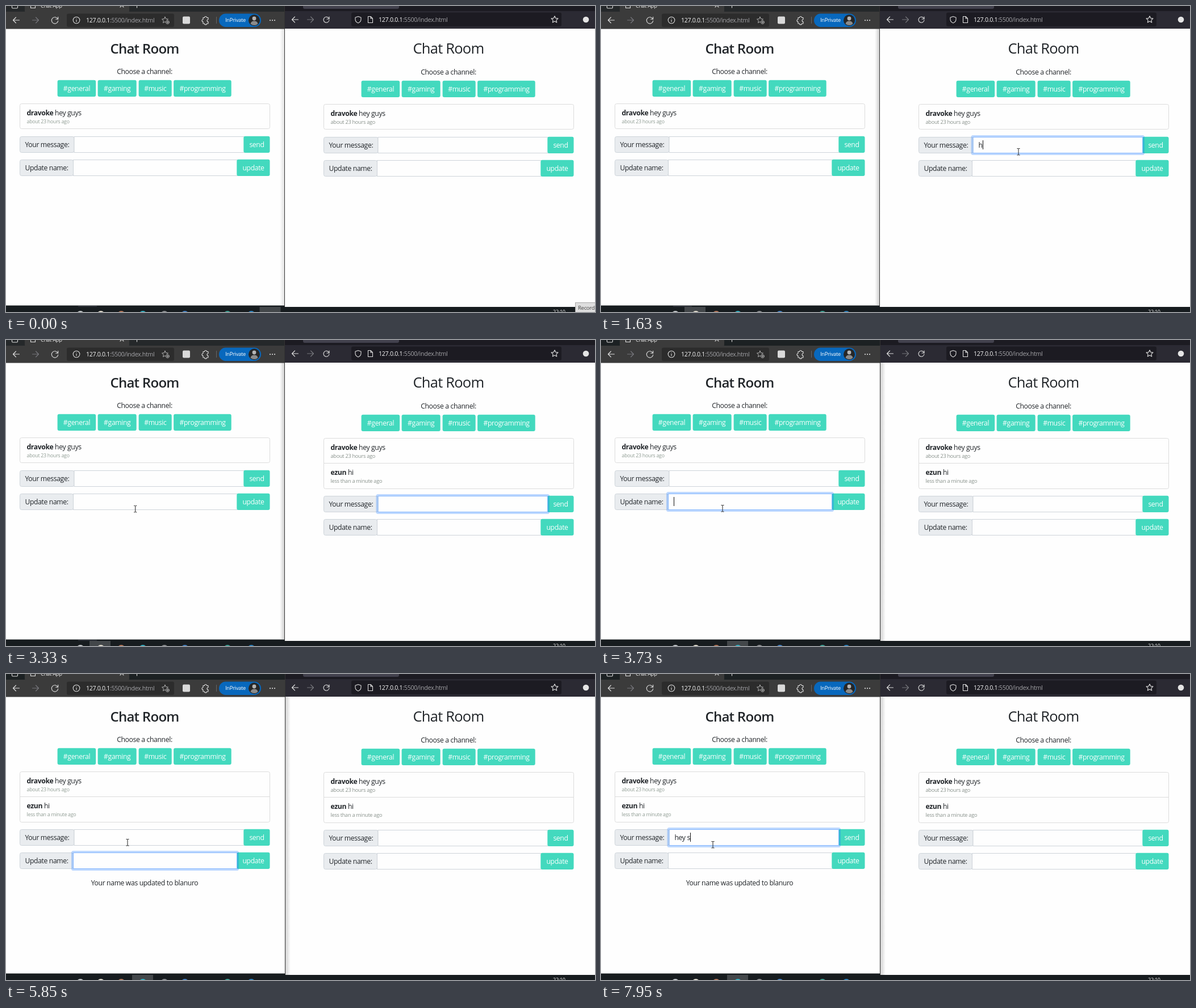
Recreate the animation shown at these times as an HTML page. Size 1037 by 540 pixels, loop 8000 ms.

```html
<!DOCTYPE html>
<html lang="en">
<head>
<meta charset="utf-8">
<title>Chat Room</title>
<style>
  html, body { margin: 0; width: 100%; height: 100%; overflow: hidden; background: #fefefe; }
  svg { display: block; width: 1037px; height: 540px; }
  text { font: 12.2px "Open Sans", "Noto Sans", sans-serif; letter-spacing: -.03em; white-space: pre; fill: #212529; }
  .b { font-weight: 700; }
  .mid { text-anchor: middle; }
  .line { fill: none; stroke: #dedede; stroke-width: 1.1; stroke-linecap: round; stroke-linejoin: round; }
  .dim { stroke: #77777d; }
  .soft { stroke: #b4b4b4; stroke-width: 1; }
</style>
</head>
<body>
<svg id="stage" viewBox="0 0 1037 540">
  <defs>
    <linearGradient id="shadeL"><stop offset="0" stop-opacity="0"/><stop offset="1" stop-opacity=".18"/></linearGradient>
    <linearGradient id="shadeR"><stop offset="0" stop-opacity=".18"/><stop offset="1" stop-opacity="0"/></linearGradient>
  </defs>
</svg>
<script>
const LOOP = 8000, SHIFT = 44, TEAL = '#43d9be';
const stage = document.getElementById('stage');

function add(tag, attrs, parent = stage, text) {
  const node = document.createElementNS('http://www.w3.org/2000/svg', tag);
  for (const key in attrs) node.setAttribute(key, attrs[key]);
  if (text !== undefined) node.textContent = text;
  return parent.appendChild(node);
}
const rect = (x, y, width, height, fill, parent, more) =>
  add('rect', { x, y, width, height, fill, ...more }, parent);
const disc = (cx, cy, r, fill, parent, more) => add('circle', { cx, cy, r, fill, ...more }, parent);
const path = (d, cls = 'line', parent) => add('path', { d, class: cls }, parent);
function label(x, y, text, parent, { size, fill, cls = '' } = {}) {
  const node = add('text', { x, y, class: cls }, parent, text);
  if (size) node.style.fontSize = size + 'px';
  if (fill) node.style.fill = fill;
  return node;
}
const show = (node, on) => node.setAttribute('visibility', on ? 'visible' : 'hidden');

// Toolbar icons
const arrow = (x, y, dir, cls) =>
  path(`M${x - 5.5} ${y}h11M${x + dir * .5} ${y - 5}l${dir * 5} 5l${-dir * 5} 5`, cls);
const reload = (x, y, r) =>
  path(`M${x + r - .5} ${y - 2}A${r} ${r} 0 1 0 ${x + r} ${y + 1}M${x + r} ${y - r}v4h-4`);
function star(x, y, r, cls) {
  let d = '';
  for (let i = 0; i < 10; i++) {
    const a = i * Math.PI / 5, k = i % 2 ? r * .48 : r;
    d += (i ? 'L' : 'M') + (x + k * Math.sin(a)).toFixed(1) + ' ' + (y - k * Math.cos(a)).toFixed(1);
  }
  path(d + 'Z', cls);
}
function address(x, y, size) {
  const node = label(x, y, '127.0.0.1', stage, { size, fill: '#f6f6f6' });
  add('tspan', { fill: '#a2a2a6' }, node, ':5500/index.html');
}

// Left browser
const tabStrip = rect(0, 0, 491, 11, '#25282a');
rect(33, -6, 184, 18, '#3b3b3b', stage, { rx: 4 });
rect(0, 10, 491, 30.5, '#3b3b3b');
path('M10.5 -4V2.5Q10.5 4 12 4H19Q20.5 4 20.5 2.5V-4M43.5 -4V3.5H51.5V-4M201 -4l6 6M207 -4l-6 6M230.5 -5v8');
label(61, 3, 'Chat App', stage, { size: 9.4, fill: '#eee' });
arrow(18, 25, -1);
arrow(52, 25, 1, 'line dim');
reload(86, 25, 5.7);
rect(107, 13.5, 189, 23.5, '#2c2c2c', stage, { rx: 3 });
disc(124, 25, 5.8, 'none', stage, { class: 'line' });
path('M124 24.5v3.3M124 22v.2');
address(141, 29, 10.6);
star(280, 25, 5.8, 'line soft');
disc(284.5, 28.7, 3.3, '#2c2c2c');
disc(284.5, 28.7, 2.9, 'none', stage, { class: 'line soft' });
path('M283 28.7h3M284.5 27.2v3', 'line soft');
rect(311, 18.5, 13, 13, '#d9d9d9', stage, { rx: 2 });
path('M347 20.5h2.5a2 2 0 0 1 4 0h2.5v3.2a2 2 0 0 0 0 4v3.3h-2.5a2 2 0 0 1 -4 0h-2.5v-3.3a2 2 0 0 1 0 -4z');
rect(370, 19, 1, 12, '#666');
rect(375, 13.5, 74, 23.5, '#0868bd', stage, { rx: 11.75 });
label(386, 28.3, 'InPrivate', stage, { size: 9.3, fill: '#fff' });
disc(437, 25.2, 10, '#272727');
disc(437, 22, 3.4, '#b5b5b5');
path('M430.5 31.5q1 -5 6.5 -5t6.5 5q-6 5 -13 0z').style.cssText = 'fill:#8b8b8b;stroke:none';
for (let i = -1; i < 2; i++) disc(469 + i * 4, 25.3, 1, '#eee');

// Right browser
rect(491, 0, 546, 10, '#1c1b22');
rect(523, -6, 169, 11, '#42414d', stage, { rx: 3 });
rect(491, 9, 546, 31, '#2b2a33');
arrow(509, 24, -1);
arrow(536, 24, 1, 'line dim');
reload(564, 24, 5);
rect(608, 11.5, 370, 24.5, '#1c1b22', stage, { rx: 3 });
path('M620 18.5l5 1.8v3.2q0 4.6 -5 6.5q-5 -1.9 -5 -6.5v-3.2z');
path('M637.5 18.5h4.5l3.5 3.5v7.5h-8zM642 18.5v3.5h3.5');
address(656, 28, 10.7);
star(966, 24, 6.3);
disc(1021, 24, 5.3, '#e4e4e4');

// Taskbar
rect(0, 528.5, 491, 11.5, '#171c1f');
rect(491, 531, 546, 9, '#171c1f');
const activeApp = rect(446, 531, 37, 9, '#43474a');
const appGlow = rect(127, 529, 33, 2, '#2b2f36');
[[131, '#c9cdd0'], [167, '#e8e2d4'], [203, '#b97a5c'], [241, '#35b4c6'], [279, '#8d8f92'],
 [315, '#4a86c9'], [390, '#3fa597'], [432, '#2f86c4']]
  .forEach(([x, fill]) => disc(x, 545, 7, fill));
label(963, 542.5, '22:10', stage, { size: 9, fill: '#f2f2f2' });

// Chat page, used once per browser
const FIELDS = {
  msg: { x: 119.5, y: 230, w: 299.5, title: 'Your message:', button: 'send' },
  name: { x: 118, y: 271, w: 289, title: 'Update name:', button: 'update' }
};

function button(x, y, w, text, parent) {
  rect(x - .4, y - .3, w + .6, 29.4, TEAL, parent, { rx: 3 });
  label(x + w / 2, y + 18.8, text, parent, { cls: 'mid', fill: '#fbfffe' });
}

function chatPage(dx, dy, heading, small, smallFill) {
  const root = add('g', { transform: `translate(${dx} ${dy})` });
  const title = label(244, 83.5 - dy * .3, 'Chat Room', root, { size: heading.size, cls: 'mid' });
  title.style.fontWeight = heading.weight;
  label(244, 120, 'Choose a channel:', root, { cls: 'mid' });
  button(91, 131, 67, '#general', root);
  button(162, 131, 67.5, '#gaming', root);
  button(234, 131, 57.5, '#music', root);
  button(295.5, 131, 101, '#programming', root);

  const frame = rect(24.5, 172.5, 440, 44, 'none', root, { rx: 3, stroke: '#dcdcdc' });
  const post = (y, who, text, when, parent) => {
    const node = label(36.5, y + 20.5, '', parent);
    add('tspan', { class: 'b' }, node, who);
    add('tspan', {}, node, ' ' + text);
    label(36.5, y + 34.3, when, parent, { size: small, fill: smallFill });
  };
  post(172.5, 'dravoke', 'hey guys', 'about 23 hours ago', root);
  const reply = add('g', {}, root);
  path('M24.5 216.5h440', '', reply).setAttribute('stroke', '#dcdcdc');
  post(172.5 + SHIFT + .3, 'ezun', 'hi', 'less than a minute ago', reply);

  const form = add('g', {}, root), fields = {};
  for (const key in FIELDS) {
    const { x, y, w, title, button: action } = FIELDS[key], end = x + w;
    rect(24.5, y + .5, x - 24, 28, '#e9ecef', form, { rx: 3, stroke: '#ced4da' });
    label(33.5, y + 18.7, title, form);
    rect(x + .5, y + .5, w, 28, '#fefefe', form, { stroke: '#ced4da' });
    button(end - .3, y, 464.6 - end, action, form);
    const ring = add('g', {}, form);
    rect(x - 1.5, y - 1.5, w + 3, 32, 'none', ring, { rx: 2, stroke: '#0d6efd', 'stroke-opacity': .27, 'stroke-width': 3 });
    rect(x + .5, y + .5, w - 1, 28, 'none', ring, { stroke: '#86b7fe' });
    const text = label(x + 10, y + 18.7, '', form);
    const caret = rect(x + 10, y + 6, 1, 16, '#111', form);
    fields[key] = { x, y, w, ring, text, caret };
  }
  const status = label(244, 329, 'Your name was updated to blanuro', form, { cls: 'mid' });
  return { dx, dy, fields, status,
    setReply(on) {
      this.shift = on ? SHIFT : 0;
      frame.setAttribute('height', 44 + this.shift + (on ? 1 : 0));
      form.setAttribute('transform', `translate(0 ${this.shift})`);
      show(reply, on);
    } };
}
const pages = {
  L: chatPage(0, 0, { size: 24, weight: 600 }, 8.8, '#8f9c93'),
  R: chatPage(535, 1, { size: 25.5, weight: 400 }, 9.2, '#88918b')
};

// Window edges
const edge = rect(490, 0, 1, 531, '#333');
const shadeL = rect(482, 40, 8, 488, 'url(#shadeL)');
const shadeR = rect(492, 40, 9, 491, 'url(#shadeR)');

// Tooltips and pointer
function tip(x, y, w, h, fill, border, text, style) {
  const g = add('g', {});
  rect(x + .5, y + .5, w - 1, h - 1, fill, g, { stroke: border });
  label(x + 5, y + h / 2 + 3.3, text, g, style);
  return g;
}
const recordTip = tip(1002, 523, 40, 20, '#dedede', '#a8a8a8', 'Record', { size: 9.5, fill: '#444' });
const fieldTip = tip(203, 313, 105, 18, '#414141', '#414141', 'Please fill out this field.', { size: 9.4, fill: '#fff' });

const pointer = add('g', {});
const spot = disc(0, 0, 9, '#fbf06a', pointer, { opacity: .85 });
const beam = path('M-2.5 -5.5h1.7l.8 .7l.8 -.7h1.7M0 -4.8v10.1M-2.5 6h1.7l.8 -.7l.8 .7h1.7', '', pointer);
beam.style.cssText = 'fill:none;stroke:#222;stroke-width:1';
const hand = path('M-.5 0v12l2.8 -2.6l2 4.3l1.9 -.9l-1.9 -4.1h3.7z', '', pointer);
hand.style.cssText = 'fill:#fff;stroke:#222;stroke-width:.9';

// Timeline
const TYPED = {
  'R.msg': [[1630, 'h'], [1830, 'hi'], [2560, '']],
  'L.name': [[4600, 'b'], [4730, 'bl'], [4800, 'bla'], [4930, 'blan'], [5060, 'blanu'], [5130, 'blanur'],
    [5330, 'blanuro'], [5590, '']],
  'L.msg': [[7550, 'h'], [7620, 'he'], [7720, 'hey'], [7850, 'hey '], [7950, 'hey s']]
};
const CARET = [[960, 'R.msg'], [1500, ''], [1630, 'R.msg'], [2030, ''], [3600, 'L.name'], [4130, ''],
  [4600, 'L.name'], [5850, ''], [6380, 'L.name'], [6880, 'L.msg'], [7420, ''], [7550, 'L.msg']];
const FOCUS = { 'R.msg': [960, 3600], 'L.name': [3600, 6880], 'L.msg': [6880, 9000] };
const CLICKS = [[960, 1100], [3530, 3660], [6880, 7010]];
const MOVES = [
  { from: 60, to: 760, path: [1046, 546, 850, 350, 735, 257] },
  { from: 2500, to: 3430, path: [735, 257, 430, 312, 214, 297] },
  { from: 6060, to: 6400, path: [214, 297, 204, 298, 197, 301] }
];

const valueAt = (steps, t) => steps.reduce((v, [time, next]) => t >= time ? next : v, '');
const clamp = v => Math.min(1, Math.max(0, v));
const ease = v => v * v * (3 - 2 * v);

function pointerAt(t) {
  const { from, to, path: p } = MOVES.filter(m => t >= m.from).pop() || MOVES[0];
  const k = ease(clamp((t - from) / (to - from))), j = 1 - k;
  return [0, 1].map(i => j * j * p[i] + 2 * j * k * p[i + 2] + k * k * p[i + 4]);
}
const overField = (x, y) => Object.values(pages).some(page =>
  Object.values(page.fields).some(f => {
    const px = x - page.dx - f.x, py = y - page.dy - page.shift - f.y;
    return px >= 0 && px <= f.w && py >= 0 && py <= 29;
  }));

function render(t) {
  pages.R.setReply(t >= 2130);
  pages.L.setReply(t >= 3800);
  show(pages.L.status, t >= 5590);
  show(pages.R.status, false);

  const caretIn = valueAt(CARET, t);
  for (const side in pages) for (const key in FIELDS) {
    const id = side + '.' + key, f = pages[side].fields[key], focus = FOCUS[id];
    f.text.textContent = valueAt(TYPED[id] || [], t);
    f.ring.setAttribute('opacity', focus ? clamp((t - focus[0]) / 130) * clamp(1 - (t - focus[1]) / 130) : 0);
    show(f.caret, caretIn === id);
    if (caretIn === id) f.caret.setAttribute('x', Math.round(f.x + 10 + f.text.getComputedTextLength()));
  }

  const leftActive = t >= 3600;
  tabStrip.setAttribute('fill', leftActive ? '#1c2123' : '#25282a');
  edge.setAttribute('x', leftActive ? 491 : 490);
  show(shadeL, !leftActive);
  show(shadeR, leftActive);
  shadeL.setAttribute('opacity', t < 960 ? .6 : 1);
  activeApp.setAttribute('x', t < 960 ? 446.5 : leftActive ? 222 : 147);
  show(appGlow, !leftActive);
  show(recordTip, t < 130);
  show(fieldTip, t >= 6730 && t < 6880);

  const [x, y] = pointerAt(t), text = overField(x, y);
  pointer.setAttribute('transform', `translate(${x.toFixed(1)} ${y.toFixed(1)})`);
  show(beam, text);
  show(hand, !text);
  show(spot, CLICKS.some(([a, b]) => t >= a && t < b));
}

const start = performance.now();
(function tick() {
  render((performance.now() - start) % LOOP);
  requestAnimationFrame(tick);
})();
</script>
</body>
</html>
```
